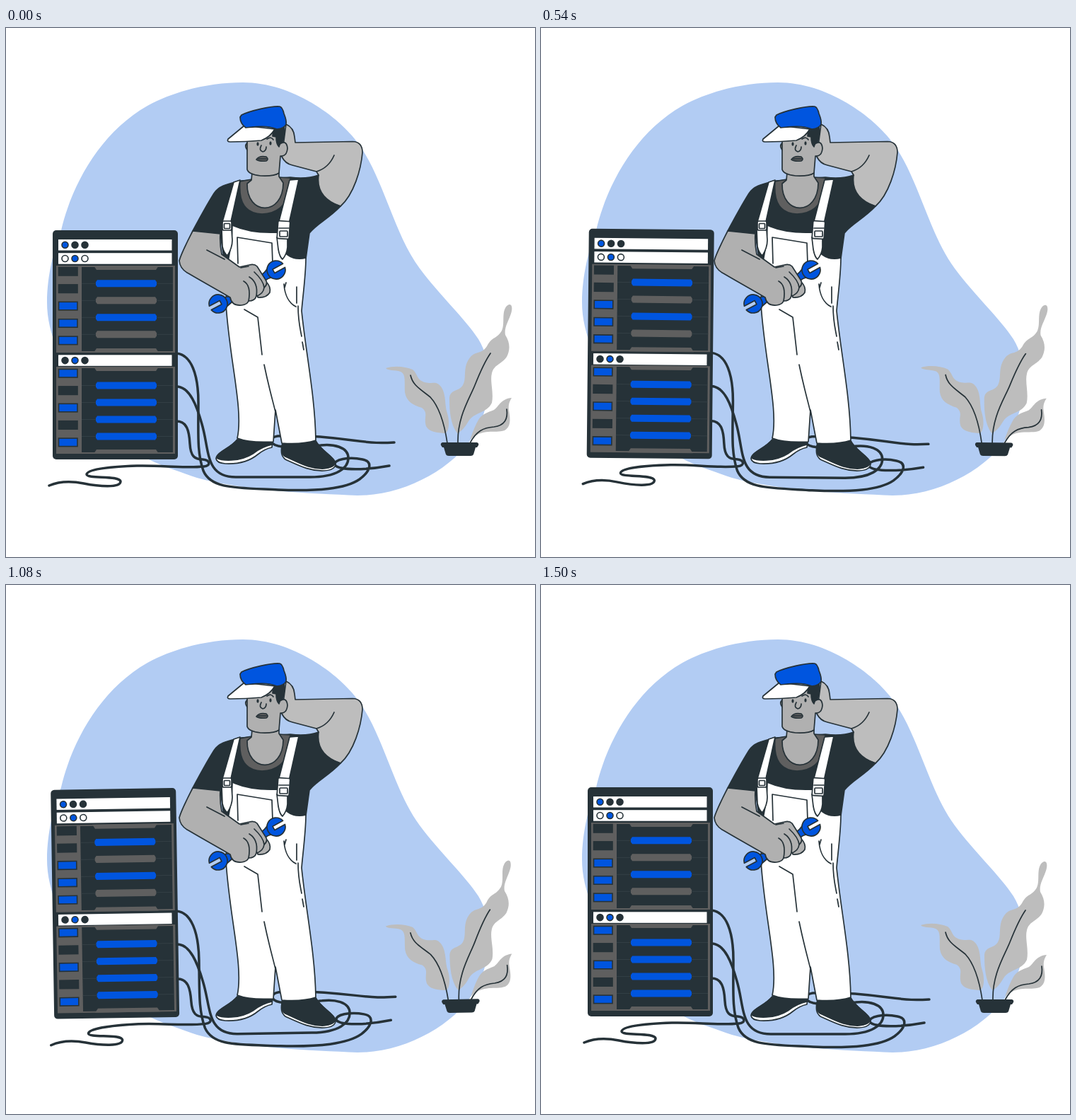
These frames come from a looping animation (748x748 px, 1.54 s). An HTML page:

```html
<!DOCTYPE html>
<html lang="en">
<head>
<meta charset="utf-8">
<title>Technician and server rack</title>
<style>
  html, body { margin: 0; height: 100%; overflow: hidden; background: #fff; }
  svg { display: block; width: 100vw; height: 100vh; }
  .ink { fill: #263238; }
  .blue { fill: #0055df; }
  .grey { fill: #5f5f5f; }
  .white { fill: #fff; }
  .skin { fill: #b0b0b0; }
  .arm { fill: #bdbdbd; }
  .line { fill: none; }
  #man, .stems { stroke: #263238; stroke-width: 1.7; stroke-linecap: round; stroke-linejoin: round; }
  .cables { fill: none; stroke: #263238; stroke-width: 3.5; stroke-linecap: round; }
</style>
</head>
<body>
<svg viewBox="0 0 748 748">
  <path fill="#b2ccf3" d="M58 388C58 350 68 312 78 286C93 222 133 148 200 110C240 88 290 77 335 77C405 77 470 125 498 163C535 215 548 290 585 340C615 380 650 412 668 440C690 475 688 535 660 578C632 622 565 661 497 661C430 658 340 655 270 636C235 624 215 617 200 609C150 580 100 520 75 462C63 432 58 410 58 388Z"/>

  <g id="rack">
    <g class="cables">
      <path d="M241 460C262 462 272 490 272 530C272 575 270 600 279 626C290 652 325 650 385 653C440 655 480 652 500 638C516 626 519 613 504 610C485 606 462 610 465 618C472 626 510 625 542 619"/>
      <path d="M241 507C260 507 270 535 277 560C288 597 281 635 325 635H430C468 635 484 622 484 608C484 592 462 588 445 590C420 592 400 594 385 591C372 588 372 579 384 577C425 575 460 579 490 583S530 587 549 586"/>
      <path d="M241 556C256 556 259 570 260 588C261 606 267 610 278 610C289 611 290 619 280 620C250 623 220 618 185 619C155 620 116 623 114 631C114 638 160 632 162 641C162 651 130 648 110 644S75 641 61 647"/>
    </g>
    <rect class="ink" x="66" y="286" width="177" height="324" rx="5"/>
  </g>

  <g id="plant">
    <g class="arm">
      <path d="M638 573C628 560 627 540 627 525C627 510 640 515 646 505C652 495 645 480 656 466C664 456 672 462 680 450C687 436 694 440 701 428C706 418 700 402 708 393C715 387 717 395 714 404C710 416 704 424 706 434C713 445 713 455 708 465C700 476 690 476 687 488C684 500 690 515 687 530C680 545 662 543 654 556Q646 570 638 573Z"/>
      <path d="M537 481C550 477 565 479 575 483C583 490 580 497 592 501C606 504 607 498 615 507C623 518 620 535 624 545C628 558 626 573 620 573C605 572 598 570 594 563C590 550 598 545 588 537C575 533 566 528 564 515C563 500 566 490 558 486C550 483 540 485 537 481Z"/>
      <path d="M715 523C700 524 697 535 690 540C680 544 672 546 667 556C662 565 660 572 656 582C675 565 690 574 705 569C716 563 712 548 711 540C710 532 712 528 715 523Z"/>
    </g>
    <g class="stems line">
      <path d="M639 587C638 550 655 525 663 505S678 470 685 460"/>
      <path d="M624 587C620 560 612 535 600 522C585 510 575 505 572 491"/>
      <path d="M656 587C665 570 675 565 690 564C705 562 710 553 708 539"/>
    </g>
    <path class="ink" d="M617 586H666Q669 587 668 590L666 593H664L661 603Q660 605 657 605H626Q623 605 622 603L619 593H617L615 590Q614 587 617 586Z"/>
  </g>

  <g id="man">
    <path class="arm" d="M396 136Q407 141 408 154L409 162L490 160.500Q504 161 504 176C502 200 492 235 473 252L440 240L438 212L442 208L439 203L405 194Q395 192 390 182Z"/>
    <path class="line" d="M439 203Q456 198 464 180"/>

    <path class="white" d="M327 582C318 594 297 600 297 609Q298 615 310 616C330 617 345 612 356 603Q366 595 376 593L377 584Z"/>
    <path class="ink" d="M327 582C318 594 297 600 298 608C305 612 330 614 349 602Q362 592 376 589L377 584Z"/>
    <path class="white" d="M391 587C388 599 389 605 395 610C415 619 430 627 450 626Q465 625 466 617C464 606 445 598 438 584Z"/>
    <path class="ink" d="M391 587C389 597 389 602 395 606C415 615 430 624 450 623Q463 622 466 615C464 606 445 598 438 584Z"/>

    <path class="ink" d="M332 216C312 221 301 223 294 234C284 250 272 272 264 287L303 291L308 325L424 326L429 290C440 276 456 270 473 252C450 244 439 230 442 208Q425 214 402 211Z"/>
    <path class="grey" d="M331 217Q327 262 362 263Q402 262 402 212L386 211L347 214Z"/>
    <path class="skin" d="M348 204L347 215L341 220C340 266 392 266 392 219L386 210V200Z"/>

    <path class="white" d="M320 279C340 288 365 290 385 289L397 320Q409 329 424 325C424 350 419 385 418 400C424 460 437 520 438 583Q420 589 390 587L381 540L378 585Q345 587 327 580C336 540 316 470 311 390L314 330Q320 300 320 279Z"/>
    <path class="white" d="M322 218L331 215L318 274H306Z"/>
    <path class="white" d="M401 215L414 214L400 277H385Z"/>
    <path class="white" d="M305 285L306 309Q308 318 313 322Q320 311 320 300L319 285Z"/>
    <path class="white" d="M383 296L385 313Q387 324 391 327Q397 320 398 310V296Z"/>
    <g class="white">
      <rect x="306" y="273" width="13" height="13" rx="2"/>
      <rect x="308.500" y="276.500" width="8" height="7" rx="1"/>
      <rect x="384" y="273" width="17" height="25" rx="2" transform="rotate(4 392 285)"/>
      <rect x="387" y="287" width="11" height="8" rx="1"/>
      <path d="M386 283H400"/>
    </g>
    <path class="line" d="M328 333L327 296L376 304L377 333M337 398L356 409L362 462M365 476C372 510 378 530 381 543M393 362C394 377 400 389 410 394M396 360L394 367M411 366L411 389M413 393C413 415 416 425 418 436M419 444L421 455"/>

    <path class="skin" d="M368 359Q375 366 373 374Q368 382 356 381L355 365Z"/>
    <g class="blue">
      <path d="M308 381L318 379L360 350Q366 346 369 341L380 352Q372 353 368 356L320 387L312 394Z"/>
      <path id="jaw" transform="translate(382 342) rotate(-29)" d="M12.600 -3H-4V3H12.600A13 13 0 1 1 12.600 -3Z"/>
      <path transform="translate(300 390) rotate(152)" d="M12.600 -3H-4V3H12.600A13 13 0 1 1 12.600 -3Z"/>
    </g>
    <path class="skin" d="M264 287C255 305 248 318 245 329Q246 341 258 347C280 360 302 372 317 381Q319 393 333 392Q341 391 343 386Q352 386 354 379Q364 376 365 367Q371 362 367 356L355 337Q351 333 344 335L330 338L305 320Q302 305 303 291Z"/>
    <path class="line" d="M284 314L309 327M332 339L343 337M336 358Q347 364 343 386M344 352Q357 360 354 379M351 345Q364 357 365 367"/>

    <path class="skin" d="M342 162Q335 166 343 175Z"/>
    <path class="skin" d="M341 155V200Q343 207 360 209Q379 210 386 205L388 181Q397 182 398 170Q397 159 389 163V145Z"/>
    <path class="ink" d="M378 142L393 138Q395 150 391 161Q387 163 386 168Q382 164 382 154L377 153Z"/>
    <g class="ink" stroke="none">
      <ellipse cx="356" cy="164" rx="1.600" ry="2.800"/>
      <ellipse cx="374" cy="163" rx="1.600" ry="2.800"/>
    </g>
    <path class="line" d="M369 157Q375 153 378 158M361 166Q357 173 363 175Q368 174 368 168"/>
    <path class="grey" d="M354 186Q358 180 368 182Q372 186 368 188Q358 189 354 186ZM357 185H368"/>
    <path class="white" d="M337 138L314 157Q312 161 317 161C335 161 350 160 361 159Q374 154 380 143Z"/>
    <path class="blue" d="M333 123C345 117 375 110 387 111Q391 112 393 121Q397 131 396 136Q394 142 383 143C367 137 350 140 339 141Q331 135 331 126Z"/>
  </g>
</svg>
<script>
const rack = document.getElementById('rack');
const plant = document.getElementById('plant');
const INK = '#263238';

const rect = (kind, x, y, w, h, extra = '') =>
  `<rect class="${kind}" x="${x}" y="${y}" width="${w}" height="${h}" ${extra}/>`;
const poly = (kind, points) => `<polygon class="${kind}" points="${points}"/>`;
const outline = `stroke="${INK}" stroke-width="1.6"`;

function strip(y, lights) {
  return rect('white', 74, y, 160.5, 15.5) + lights.map((kind, i) =>
    `<circle class="${kind}" cx="${83.5 + i * 14}" cy="${y + 7.8}" r="4.5" ${outline}/>`).join('');
}

function bay(top, height, ledY, leds, barY, bars) {
  const end = top + height;
  let out = rect('grey', 71, top, 168, height) + rect('ink', 107, top + 2, 129, height - 4);
  out += poly('grey', `124,${top} 216,${top} 212,${top + 6} 128,${top + 6}`);
  out += poly('grey', `124,${end} 216,${end} 212,${end - 6} 128,${end - 6}`);
  leds.forEach((kind, i) => out += rect(kind, 74.5, ledY + i * 24.4, 26.5, 11.5, outline));
  bars.forEach((kind, i) => {
    const y = barY + i * 24;
    out += `<path d="M107 ${y}H236" stroke="#39454b" stroke-width=".7"/>`;
    out += poly(kind, `129,${y - 5} 211,${y - 5} 213,${y - 2} 213,${y + 2} 211,${y + 5} 129,${y + 5} 127,${y + 2} 127,${y - 2}`);
  });
  return out;
}

rack.insertAdjacentHTML('beforeend',
  strip(299, ['blue', 'ink', 'ink']) +
  strip(318.2, ['white', 'blue', 'white']) +
  bay(336, 123, 338.5, ['ink', 'ink', 'blue', 'blue', 'blue'], 361.3, ['blue', 'grey', 'blue', 'grey']) +
  strip(462.3, ['ink', 'blue', 'ink']) +
  bay(479, 123, 482.5, ['blue', 'ink', 'blue', 'ink', 'blue'], 505.5, ['blue', 'blue', 'blue', 'blue']));

// Sway: 0 to 1 degree, to -1, and back, linear over 36 steps at 24 per second.
function sway(step) {
  if (step <= 9) return step / 9;
  if (step <= 27) return 1 - (step - 9) / 9;
  return (step - 36) / 9;
}

function draw(now) {
  const time = now % 1540;
  const angle = sway(Math.min(36, Math.floor((time + 4) * 0.024)));
  rack.setAttribute('transform', `rotate(${angle} 305 470)`);
  plant.setAttribute('transform', `rotate(${angle} 626 498)`);
  requestAnimationFrame(draw);
}
draw(performance.now());
</script>
</body>
</html>
```
